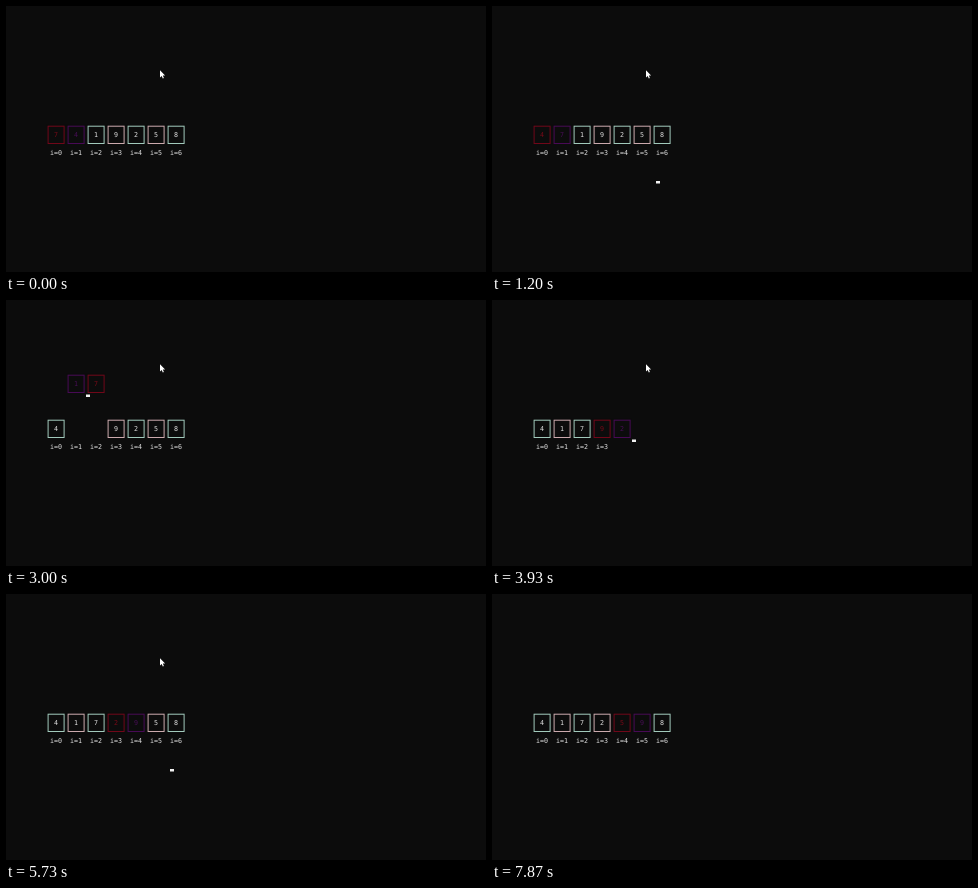
Animation of 480x266 px, one loop 8 s. Source, as an HTML page with a canvas:

```html
<!DOCTYPE html>
<html lang="en">
<head>
<meta charset="utf-8">
<title>Bubble sort in a console</title>
<style>
  html, body { margin: 0; width: 480px; height: 266px; overflow: hidden; background: #0c0c0c; }
  canvas { display: block; }
</style>
</head>
<body>
<canvas id="stage" width="480" height="266"></canvas>
<script>
const ctx = document.getElementById('stage').getContext('2d');
const LOOP = 8000, TICK = 1000 / 15;
const CELL = 4, ROW = 8.9, PITCH = 5 * CELL, LEFT = 40, TOP = 119.7;
const WIDE = 16, HIGH = 17.3;   // distance between the opposite lines of a box
const BG = '#0c0c0c', TEXT = '#e2e2e2';
const RED = { line: '#700719', text: '#780a18' };
const PURPLE = { line: '#480a55', text: '#480e56' };
const PLAIN = [{ line: '#a2cabc', text: TEXT }, { line: '#ccaaae', text: TEXT }];

const VALUES = [7, 4, 1, 9, 2, 5, 8];
const COMPARE_AT = [-426, 1555, 3440, 3873, 5987];   // start of each comparison
const HOLD = 430, LIFT_TIME = 220, LIFTS = 5;
const SPEED = 1.6;              // console writes per ms
const BOX = 16, UNIT = 20;      // writes for a box, and for a box with its label
const CARET_TIME = 345;

function rect(x, y, w, h, color) {
  ctx.fillStyle = color;
  ctx.fillRect(x, y, w, h);
}

function write(text, x, y, color) {
  ctx.fillStyle = color;
  ctx.fillText(text, x, y);
}

function caret(x, y) {
  rect(x, y, CELL, 2.5, '#f2f2f2');
}

function drawBox(value, x, y, style) {
  rect(x, y - 1, PITCH, 3, BG);
  rect(x, y + HIGH - 1, PITCH, 3, BG);
  for (let col = 0; col < 5; col += 2) rect(x + col * CELL, y, CELL, HIGH, BG);
  ctx.strokeStyle = style.line;
  ctx.strokeRect(x + 2.1, y + 0.5, WIDE, HIGH);
  write(value, x + 2 * CELL, y + 11.7, style.text);
}

// A box being written column by column, before its sides are set.
function drawPartial(value, x, y, style, writes) {
  const col = Math.floor(writes / 3), part = writes % 3;
  rect(x, y, (col + (part > 0)) * CELL, 1, style.line);
  rect(x, y + HIGH, col * CELL, 1, style.line);
  if (writes > 6) write(value, x + 2 * CELL, y + 11.7, style.text);
  caret(x + col * CELL, y + 19.8);
}

function drawPointer(t) {
  const p = Math.min(1, Math.max(0, (t - 6000) / 500));
  if (p === 1) return;
  ctx.save();
  ctx.translate(154 + 43 * p, 64.3 + 202 * p * p);
  ctx.fillStyle = '#fff';
  ctx.fill(new Path2D('M0 0V7.2L1.7 5.7L2.8 8.2L3.9 7.7L2.8 5.2H5.1Z'));
  ctx.restore();
}

// One pass of bubble sort: a wrong pair rises and crosses, then drops exchanged.
function stateAt(t) {
  const values = VALUES.slice();
  let pair, lift, age;
  COMPARE_AT.forEach((start, a) => {
    if (t < start) return;
    pair = a;
    lift = 0;
    age = t - start;
    if (values[a] <= values[a + 1] || age < HOLD) return;
    const moving = age - HOLD;
    lift = Math.floor(moving / LIFT_TIME) + 1;
    age = moving % LIFT_TIME;
    if (lift > LIFTS) {
      lift = 0;
      age = moving - LIFTS * LIFT_TIME;
      [values[a], values[a + 1]] = [values[a + 1], values[a]];
    }
  });
  return { values, pair, lift, age };
}

function drawConsole(t) {
  const { values, pair, lift, age } = stateAt(t);
  const writes = Math.round(age * SPEED);
  const order = values.map((_, i) => i);
  if (lift) order.push(...order.splice(pair, 2));

  if (writes < 4) return caret(0, 6.5);

  order.forEach((i, n) => {
    const done = writes - n * UNIT;
    if (done < 0) return;
    const side = i - pair, paired = side === 0 || side === 1;
    const style = paired ? [RED, PURPLE][side] : PLAIN[i % 2];
    const up = paired ? lift : 0;
    const cellX = LEFT + i * PITCH;
    const x = cellX + (side === 0 ? up : -up) * CELL;
    const y = TOP - Math.round(up * ROW);
    if (done < BOX) return drawPartial(values[i], x, y, style, done);
    drawBox(values[i], x, y, style);
    if (done >= UNIT) write('i=' + i, cellX + CELL, 149.3, TEXT);
    const last = n === values.length - 1;
    if (done < UNIT || (last && lift)) caret(x + PITCH, y + 19.8);
  });

  if (!lift && writes >= values.length * UNIT && age < CARET_TIME) caret(164, 175);
}

function render(now) {
  const t = Math.floor((now % LOOP) / TICK + 0.06) * TICK;
  rect(0, 0, 480, 266, BG);
  ctx.font = '6.67px "DejaVu Sans Mono", "Noto Sans Mono", monospace';
  drawConsole(t);
  drawPointer(t);
}

const begin = performance.now();
function loop() {
  render(performance.now() - begin);
  requestAnimationFrame(loop);
}
loop();
</script>
</body>
</html>
```
